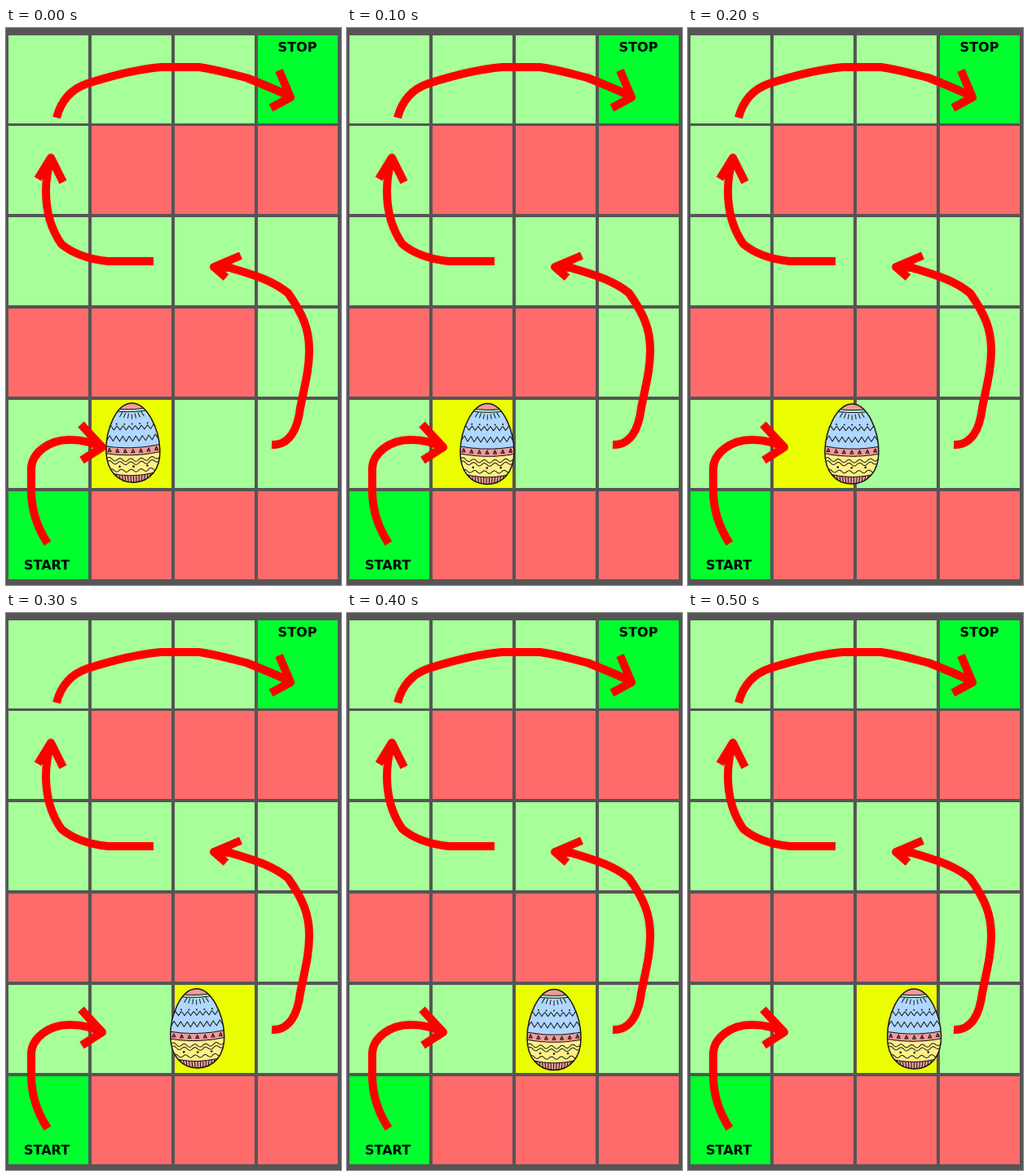
An HTML page with a canvas that plays this animation: 411x683 px, repeating every 0.6 s.

```html
<!DOCTYPE html>
<html lang="en">
<head>
<meta charset="utf-8">
<title>Egg path</title>
<style>
  html, body { margin: 0; width: 100%; height: 100%; overflow: hidden; background: #555; }
  canvas { display: block; }
</style>
</head>
<body>
<canvas id="stage" width="411" height="683"></canvas>
<script>
const ctx = document.getElementById('stage').getContext('2d');
const STEP = 100;

const COLORS = { g: '#a6ff99', r: '#ff6b6b', b: '#00ff2e', y: '#ebff00' };
const BOARD = ['gggb', 'grrr', 'gggg', 'rrrg', 'gggg', 'brrr'];

// Shaft and head of each arrow
const ARROWS = [
  'M51 632C38 612 31 590 31 567V541C31 522 52 504 80 505C97 505 108 510 119 514M92 486L103 498L118 514L93 530',
  'M326 511C349 512 358 490 361 466C366 440 372 420 372 395C372 370 365 352 346 325C325 308 300 302 275 294L255 293M288 279L255 293L270 306',
  'M181 286H125C105 284 85 279 68 265C54 245 49 222 49 200C49 183 52 170 55 159M39 185L55 159L70 189',
  'M62 110C66 95 76 76 100 68C125 60 155 51 190 48H237C258 51 275 56 295 61C310 67 330 75 349 84M335 52L349 85L325 98'
].map(d => new Path2D(d));

// Egg poses: centre x, centre y, half height, tilt in degrees, highlighted column
const POSES = [
  [155.5, 508.6, 48.6, -2, 1],
  [172, 510, 49.4, 0.5, 1],
  [201, 510, 49, 0.5, 1],
  [234.5, 509.4, 48.6, -1.5, 2],
  [254, 511, 49.4, 0, 2],
  [277.5, 510, 49, -0.5, 2]
];

const SHELL = new Path2D('M0 -48.5C19 -48.5 33 -16 33 10C33 34 19 48.5 0 48.5C-19 48.5 -33 34 -33 10C-33 -16 -19 -48.5 0 -48.5Z');

// Height of a line that sags in the middle, following the round shell
const sag = (x, y, depth) => y + depth * (1 - (x / 33) ** 2);

function drawCell(col, row, color) {
  ctx.fillStyle = color;
  ctx.fillRect(3 + 102 * col, row ? 8 + 112 * row : 9, 98, 108);
}

function drawBoard(active) {
  ctx.fillStyle = '#555';
  ctx.fillRect(0, 0, 411, 683);
  BOARD.forEach((line, row) => [...line].forEach((key, col) => {
    drawCell(col, row, COLORS[row === 4 && col === active ? 'y' : key]);
  }));
  ctx.fillStyle = '#000';
  ctx.font = 'bold 16px "DejaVu Sans", sans-serif';
  ctx.textAlign = 'center';
  ctx.fillText('STOP', 357.5, 29);
  ctx.fillText('START', 50, 664);

  ctx.strokeStyle = '#f00';
  ctx.lineWidth = 10;
  ctx.lineCap = 'butt';
  ctx.lineJoin = 'round';
  ARROWS.forEach(path => ctx.stroke(path));
}

function band(y, depth, color) {
  ctx.beginPath();
  ctx.moveTo(-35, 52);
  for (let x = -35; x <= 35; x += 2) ctx.lineTo(x, sag(x, y, depth));
  ctx.lineTo(35, 52);
  ctx.closePath();
  ctx.fillStyle = color;
  ctx.fill();
  ctx.stroke();
}

function wave(y, depth, height, period, shape) {
  ctx.beginPath();
  for (let x = -35; x <= 35; x += 0.5) {
    ctx.lineTo(x, sag(x, y, depth) + height * shape(x / period));
  }
  ctx.stroke();
}

const zigzag = t => 4 * Math.abs(t - Math.floor(t) - 0.5) - 1;
const ripple = t => Math.sin(2 * Math.PI * t);

function dots(y, depth, gap, radius) {
  ctx.fillStyle = '#171717';
  for (let x = -2 * gap; x <= 2 * gap; x += gap) {
    ctx.beginPath();
    ctx.arc(x, sag(x, y, depth), radius, 0, 7);
    ctx.fill();
  }
}

function drawEgg([x, y, half, tilt]) {
  ctx.save();
  ctx.translate(x, y);
  ctx.rotate(tilt * Math.PI / 180);
  ctx.scale(1, half / 48.5);
  ctx.save();
  ctx.clip(SHELL);
  ctx.strokeStyle = '#171717';
  ctx.lineWidth = 1;

  ctx.fillStyle = '#f19a9a';
  ctx.fillRect(-35, -50, 70, 100);
  band(-45, 4, '#b3f0cf');
  band(-42, 4, '#afd7ff');

  // Short rays below the cap
  for (let i = -3; i <= 3; i++) {
    ctx.beginPath();
    ctx.moveTo(i * 3.8, -35 - Math.abs(i));
    ctx.lineTo(i * 5, -29 - Math.abs(i));
    ctx.stroke();
  }
  dots(-25, 2, 9.5, 1);
  wave(-19.5, 1, 2.6, 7.5, zigzag);
  wave(-7, 2, 3.2, 8, zigzag);

  band(3, 3, '#f19a9a');
  for (let i = -3; i <= 3; i++) {
    const cx = i * 9.6, cy = sag(cx, 7, 3);
    ctx.beginPath();
    ctx.moveTo(cx, cy - 2);
    ctx.lineTo(cx + 2, cy + 2);
    ctx.lineTo(cx - 2, cy + 2);
    ctx.closePath();
    ctx.fillStyle = '#b85f68';
    ctx.fill();
    ctx.stroke();
  }

  band(12, 3, '#fff086');
  wave(18, 3, 1.8, 13, ripple);
  wave(22, 3, 1.8, 13, ripple);
  dots(27, 2, 17, 1.3);
  wave(32, 2, 1.6, 12, ripple);

  band(35, 5, '#f19a9a');
  for (let sx = -25; sx <= 25; sx += 3.5) {
    ctx.beginPath();
    ctx.moveTo(sx, sag(sx, 35, 5));
    ctx.lineTo(sx * 0.9, 50);
    ctx.stroke();
  }
  ctx.restore();

  ctx.strokeStyle = '#171717';
  ctx.lineWidth = 1.5;
  ctx.stroke(SHELL);
  ctx.restore();
}

const start = performance.now();

function render(now) {
  const step = Math.floor(Math.max(0, now - start) / STEP) % POSES.length;
  const pose = POSES[step];
  drawBoard(pose[4]);
  drawEgg(pose);
  requestAnimationFrame(render);
}
render(start);
</script>
</body>
</html>
```
